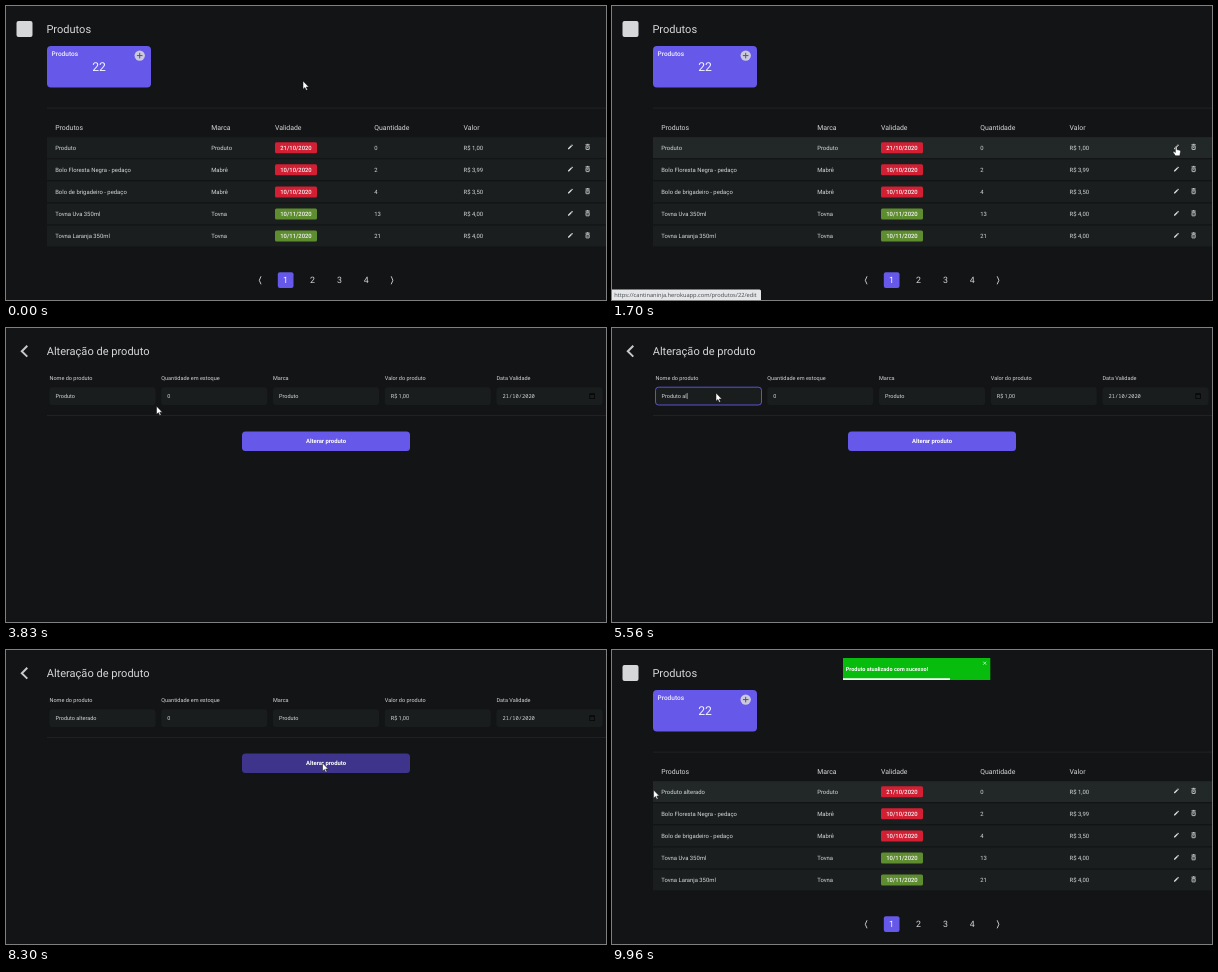
Write an HTML page that moves like this. It is 600x294 px and loops after 10000 ms.

```html
<!DOCTYPE html>
<html lang="pt-BR">
<head>
<meta charset="utf-8">
<title>Produtos</title>
<style>
html, body { margin: 0; width: 100%; height: 100%; overflow: hidden; background: #121415; }
svg { display: block; width: 600px; height: 294px; }
text { font-family: Roboto, sans-serif; text-rendering: geometricPrecision; white-space: pre; }
.mono { font-family: "Noto Sans Mono", monospace; }
.url { font-family: "Open Sans", sans-serif; }
</style>
</head>
<body>
<svg id="stage" viewBox="0 0 600 294"></svg>
<script>
const LOOP = 10000, OPEN_FORM = 2400, LOADED = 2750, FOCUS = 4500, BLUR = 7650, BACK = 8350, TOAST = 8367;
const PURPLE = '#6658e8', FIELD = '#1a1d1e', ROW = '#1a1e1f', ROW_HOVER = '#222828', LIGHT = '#d6d7d8';
const ROW_Y = 131.2, PITCH = 22.1;
const BASE_NAME = 'Produto', ADDED = ' alterado';
const keyTimes = [5230, 5370, 5530, 5700, 5860, 6000, 6150, 6330, 6500];

// pointer tip: time, x, y
const route = [
  [0, 297, 75], [250, 299, 77], [700, 420, 118], [1030, 520, 138], [1450, 564, 140], [2200, 564.5, 140],
  [2500, 550, 139.5], [2700, 549, 139], [3100, 396, 117], [3500, 230, 100], [4000, 110, 67], [4130, 104, 65],
  [6700, 104, 65], [7000, 160, 80], [7450, 300, 110], [7600, 316.5, 113], [8300, 316.5, 113],
  [8800, 317, 112.5], [9050, 290, 115], [9550, 80, 136], [9800, 42, 140], [LOOP, 41.5, 140]
];

const rows = [
  ['Produto', 'Produto', '21/10/2020', '0', 'R$ 1,00'],
  ['Bolo Floresta Negra - pedaço', 'Mabrê', '10/10/2020', '2', 'R$ 3,99'],
  ['Bolo de brigadeiro - pedaço', 'Mabrê', '10/10/2020', '4', 'R$ 3,50'],
  ['Tovna Uva 350ml', 'Tovna', '10/11/2020', '13', 'R$ 4,00'],
  ['Tovna Laranja 350ml', 'Tovna', '10/11/2020', '21', 'R$ 4,00']
];
const columns = [49.2, 205.2, 269, 368.2, 457.6];

const text = (x, y, size, str, attrs = '', fill = LIGHT) =>
  `<text x="${x}" y="${y}" font-size="${size}" fill="${fill}" ${attrs}>${str}</text>`;
const rect = (x, y, w, h, fill, attrs = '') =>
  `<rect x="${x}" y="${y}" width="${w}" height="${h}" fill="${fill}" ${attrs}/>`;
const line = (d, stroke, width, attrs = '') =>
  `<path d="${d}" fill="none" stroke="${stroke}" stroke-width="${width}" ${attrs}/>`;
const MIDDLE = 'text-anchor="middle"', BOLD = 'font-weight="700"', MEDIUM = 'font-weight="500"';

function tableRow([name, brand, date, amount, price], i) {
  const top = ROW_Y + i * PITCH, base = top + 12.6, icon = top + 9.8;
  return rect(41, top, 559, 20.8, ROW, 'class="row"') +
    text(columns[0], base, 5.9, name, i ? '' : 'id="firstName"') +
    text(columns[1], base, 5.9, brand) +
    rect(269, top + 5, 42, 11, i < 3 ? '#d21f33' : '#5e8d2f', 'rx="1.5"') +
    text(290, base, 5.9, date, `${MIDDLE} ${MEDIUM}`, '#f4f4f4') +
    text(columns[3], base, 5.9, amount) +
    text(columns[4], base, 5.9, price) +
    `<path transform="translate(561.2 ${icon - 3.3}) scale(.27)" fill="#dcdcdc" d="M3 17.3V21h3.7L17.8 9.9 14.1 6.2ZM20.7 7q.7-.7 0-1.4l-2.3-2.3q-.7-.7-1.4 0l-1.9 1.8 3.8 3.8Z"/>` +
    line(`M579.4 ${icon - 2.2}h4.4M580.8 ${icon - 2.7}h1.6`, '#dcdcdc', .8) +
    rect(580, icon - 1, 3.2, 3.5, 'none', 'stroke="#dcdcdc" stroke-width=".8" rx=".3"') +
    line(`M581 ${icon}l1.2 1.3m0-1.3l-1.2 1.3`, '#dcdcdc', .5);
}

function listPage() {
  const heads = ['Produtos', 'Marca', 'Validade', 'Quantidade', 'Valor'];
  const pages = [1, 2, 3, 4].map(n => text(252.7 + n * 26.9, 277.1, 8.8, n, MIDDLE, n > 1 ? LIGHT : '#fff'));
  return rect(10.5, 15, 16, 16, LIGHT, 'rx="2"') +
    text(40.4, 27.3, 11.06, 'Produtos') +
    rect(41, 40, 104, 41.5, PURPLE, 'rx="4"') +
    text(45.6, 50.3, 6.5, 'Produtos', MEDIUM, '#f2f1ff') +
    text(93, 65.2, 12.2, '22', MIDDLE, '#f5f4ff') +
    '<circle cx="133.7" cy="49.6" r="5.2" fill="#cbc9dc"/>' +
    line('M130.9 49.6h5.6M133.7 46.8v5.6', '#55546a', 1) +
    rect(41, 101.7, 559, .8, '#222627') +
    heads.map((h, i) => text(columns[i], 124.4, 6.9, h)).join('') +
    rows.map(tableRow).join('') +
    rect(271.8, 266.2, 15.7, 15.8, PURPLE, 'rx="2"') + pages.join('') +
    line('M255 270.3l-1.7 4 1.7 4M385.2 270.3l1.7 4-1.7 4', LIGHT, .9);
}

function formPage() {
  const labels = ['Nome do produto', 'Quantidade em estoque', 'Marca', 'Valor do produto', 'Data Validade'];
  const fields = labels.map((label, i) => {
    const x = 43.5 + i * 111.75;
    return text(x, 52.1, 5.53, label) +
      rect(x, 59.2, 106, 17.8, FIELD, `rx="3" class="field" stroke-width=".9"`) +
      text(x + 6, 70, i > 3 ? 5.4 : 5.53, '', `class="value${i > 3 ? ' mono' : ''}"`);
  });
  return line('M21.3 17.8L15.8 23.2l5.5 5.4', '#c8c9ca', 2) +
    text(40.7, 27.3, 11.06, 'Alteração de produto') + fields.join('') +
    rect(583.8, 66, 4.6, 4.6, 'none', 'stroke="#050606" stroke-width=".8"') +
    line('M583.5 66.3h5.2M584.8 65v1M587.4 65v1', '#050606', .9) +
    rect(41, 87, 559, .8, '#222627') +
    rect(236, 103.6, 168, 19.4, PURPLE, 'rx="3.5" id="button"') +
    text(320, 115.3, 5.9, 'Alterar produto', `${MIDDLE} ${BOLD}`, '#fff') +
    rect(0, 65, .6, 6, '#e6e6e6', 'id="caret"');
}

const toast = rect(231, 0, 147.3, 22, '#07bc0c', 'rx=".5"') +
  text(233.7, 12.7, 5.53, 'Produto atualizado com sucesso!', BOLD, '#fff') +
  line('M371.2 3.7l3 3m0-3l-3 3', '#d5f5d6', .8) +
  rect(231, 20.2, 135, 1.8, '#e9f9e9', 'id="progress"');
const status = rect(-2, 283.6, 151, 12, '#e4e6e8', 'rx="1.5"') +
  text(2.2, 291.4, 5.7, 'https://cantinaninja.herokuapp.com/produtos/22/edit', 'class="url"', '#45484c');
const arrow = '<path d="M0 0V8.2L1.9 6.5 3.2 9.3 4.5 8.7 3.2 6H5.8Z" fill="#fff" stroke="#111" stroke-width=".5"/>';
const hand = '<path d="M-.8.6Q0-.7.8.6V3.6L3.4 4.2Q4.5 4.5 4.4 5.6L3.6 9.8H-.7L-3 6.6Q-3.2 5.4-2 5.6L-.8 6.5Z" fill="#fff" stroke="#111" stroke-width=".5"/>';

const group = (id, body) => `<g id="${id}">${body}</g>`;
const $ = id => document.getElementById(id);
$('stage').innerHTML = rect(0, 0, 600, 294, '#121415') + group('list', listPage()) + group('form', formPage()) +
  group('toast', toast) + group('status', status) + group('pointer', group('arrow', arrow) + group('hand', hand));
const rowBoxes = document.querySelectorAll('.row');
const fieldBox = document.querySelector('.field');
const values = document.querySelectorAll('.value');
const nameEnd = [...BASE_NAME + ADDED].map(() => 0);

const show = (id, on) => $(id).setAttribute('display', on ? 'inline' : 'none');
const set = (el, key, value) => el.setAttribute(key, value);
const mix = (a, b, p) => a + (b - a) * p;

function pointerAt(t) {
  const i = Math.max(1, route.findIndex(k => k[0] > t));
  const [t0, x0, y0] = route[i - 1], [t1, x1, y1] = route[i];
  const p = (t - t0) / (t1 - t0);
  return [mix(x0, x1, p), mix(y0, y1, p)];
}

// cubic-bezier(.215, .61, .355, 1)
function easeOut(x) {
  let lo = 0, hi = 1;
  for (let n = 0; n < 24; n++) {
    const s = (lo + hi) / 2, r = 1 - s;
    if (3 * r * r * s * .215 + 3 * r * s * s * .355 + s ** 3 < x) lo = s; else hi = s;
  }
  const r = 1 - lo;
  return 3 * r * r * lo * .61 + 3 * r * lo * lo + lo ** 3;
}

function bounce(p) {
  const stops = [[0, -1383], [.6, 11.5], [.75, -4.6], [.9, 2.3], [1, 0]];
  if (p >= 1) return 0;
  const i = stops.findIndex(s => s[0] > p);
  const [p0, y0] = stops[i - 1], [p1, y1] = stops[i];
  return mix(y0, y1, easeOut((p - p0) / (p1 - p0)));
}

function drawList(t, x, y) {
  $('firstName').textContent = BASE_NAME + (t >= BACK ? ADDED : '');
  rowBoxes.forEach((box, i) => {
    const top = ROW_Y + i * PITCH;
    set(box, 'fill', x >= 41 && y >= top && y < top + 20.8 ? ROW_HOVER : ROW);
  });
}

function drawForm(t, x, y) {
  const loaded = t >= LOADED, focused = t >= FOCUS && t < BLUR;
  const typed = keyTimes.filter(k => k <= t).length;
  const content = loaded
    ? [BASE_NAME + ADDED.slice(0, typed), '0', 'Produto', 'R$ 1,00', '21/10/2020']
    : ['Produto', '50', 'Marca', 'R$ 100,00', 'dd/mm/aaaa'];
  values.forEach((el, i) => {
    el.textContent = content[i];
    set(el, 'fill', loaded || i > 2 ? LIGHT : '#3b3f41');
  });
  set(fieldBox, 'stroke', focused ? PURPLE : 'none');
  const lastKey = typed ? keyTimes[typed - 1] : FOCUS;
  show('caret', focused && (t - lastKey) % 1000 < 500);
  set($('caret'), 'x', 49.6 + values[0].getComputedTextLength());
  const over = x > 236 && x < 404 && y > 103.6 && y < 123;
  set($('button'), 'fill', over ? '#3e348c' : PURPLE);
}

function draw(t) {
  const [x, y] = pointerAt(t);
  const inForm = t >= OPEN_FORM && t < BACK;
  const overPencil = !inForm && x > 560 && y > 136;
  show('list', !inForm);
  show('form', inForm);
  if (inForm) drawForm(t, x, y); else drawList(t, x, y);
  show('status', overPencil && t > 1500);
  show('hand', overPencil);
  show('arrow', !overPencil);
  set($('pointer'), 'transform', `translate(${x} ${y})`);
  show('toast', t >= TOAST);
  if (t >= TOAST) {
    const p = (t - TOAST) / 700;
    set($('toast'), 'transform', `translate(0 ${8 + bounce(p)})`);
    set($('toast'), 'opacity', Math.min(1, easeOut(Math.min(1, p / .6))));
    set($('progress'), 'width', 135 - (t - 8800) * .0241);
  }
}

const start = performance.now();
function tick() {
  draw((performance.now() - start) % LOOP);
  requestAnimationFrame(tick);
}
tick();
</script>
</body>
</html>
```
